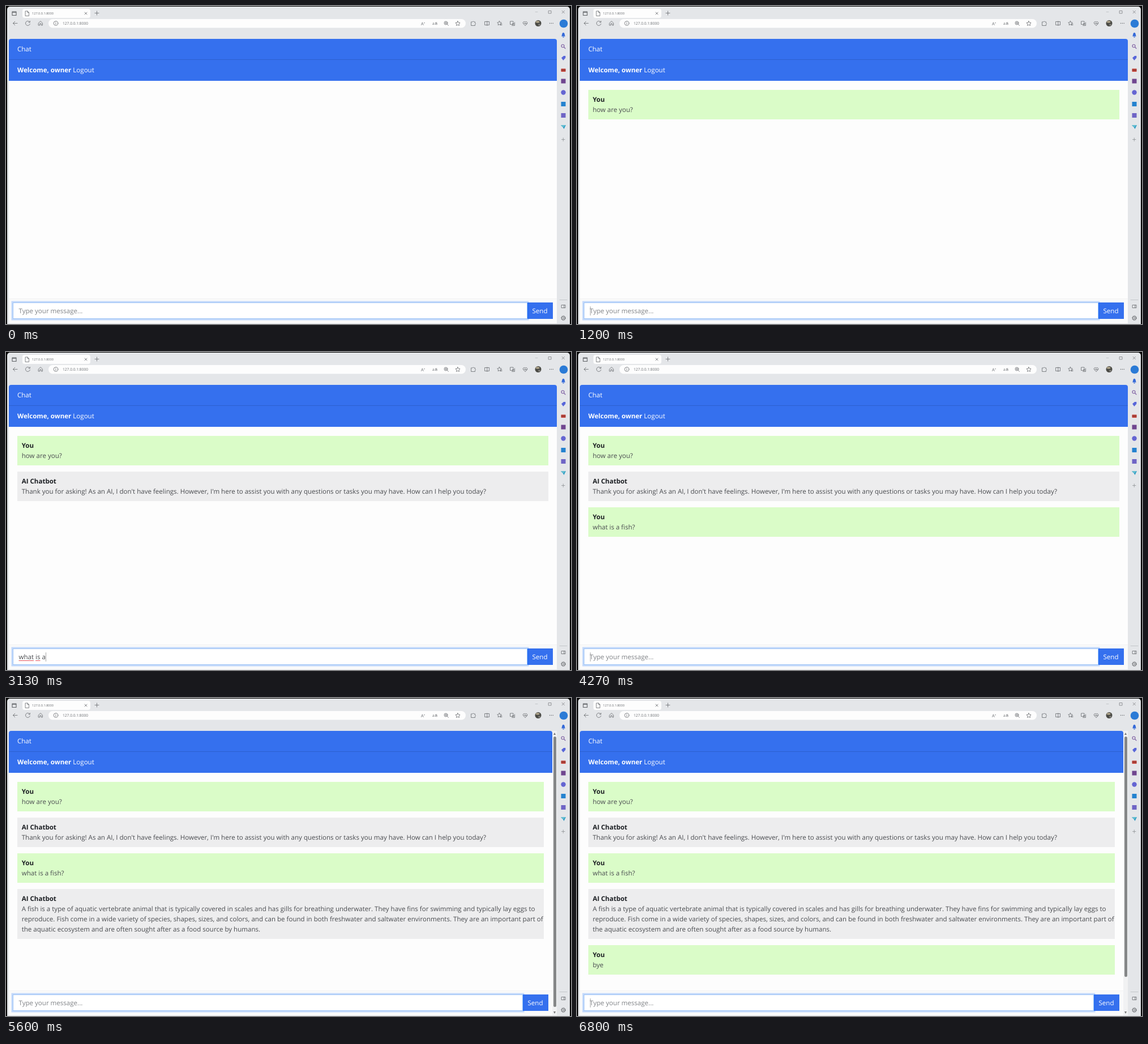
Write an HTML page that moves like this. It is 998x561 px and loops after 7010 ms.

```html
<!DOCTYPE html>
<html lang="en">
<head>
<meta charset="utf-8">
<title>Chat</title>
<style>
  html, body { margin: 0; width: 998px; height: 561px; overflow: hidden; background: #000; }
  body { position: relative; font: 11.55px/18.3px "Open Sans", sans-serif; color: #4a4c50; text-rendering: geometricPrecision; }
  body > *, .chat > *, .bar { position: absolute; box-sizing: border-box; }
  svg { left: 0; top: 0; }
  .chat { left: 5px; top: 58px; width: 968px; height: 502px; background: #fdfdfd; border-radius: 4px; }
  .scrolling .chat { width: 960px; }
  .head { left: 0; right: 0; height: 37px; padding: 0 15px; line-height: 38.2px; background: #3570ee; color: #fff; }
  .head:first-child { border-radius: 4px 4px 0 0; border-bottom: 1px solid #2d60d0; }
  .head + .head { top: 37px; }
  .messages { left: 15px; right: 15.5px; top: 90px; }
  .message { padding: 8.6px 7.7px 6.6px; margin-bottom: 11.2px; background: #ededee; white-space: pre; }
  .message.you { background: #dafcc8; }
  .message b { display: block; color: #1c1f23; }
  .foot { left: 0; right: 0; bottom: 0; height: 44px; background: #fafafa; border-top: 1px solid #f2f2f2; }
  .input { left: 7px; right: 52px; top: 465px; height: 29px; padding-left: 9.5px; line-height: 29.2px; white-space: pre; z-index: 1;
    background: #fff; border: 1px solid #9cc3f5; box-shadow: 0 0 0 2.5px rgba(13, 110, 253, .23); }
  .input u { text-decoration: underline solid #e0525c .8px; text-underline-offset: 2px; }
  .hint { color: #808387; }
  .caret { display: inline-block; width: 1px; height: 16px; margin-right: -1px; vertical-align: -4px; background: #aaa; }
  .send { right: 7px; top: 465px; width: 46px; height: 29px; line-height: 31.2px; text-align: center; background: #3570ee; color: #fff; }
  .bar { display: none; left: 965px; top: 58px; width: 8px; height: 502px; background: #f1f2f3; }
  .scrolling .bar { display: block; }
  .bar i { position: absolute; left: 2px; top: 10px; width: 4.5px; border-radius: 3px; background: #858788; }
  .bar::before, .bar::after { content: ""; position: absolute; left: 2px; border: 2.5px solid transparent; }
  .bar::before { top: 1px; border-bottom: 4px solid #777; }
  .bar::after { bottom: 1px; border-top: 4px solid #777; }
</style>
</head>
<body>
<svg width="998" height="561" fill="none" stroke="#5f6266" stroke-width=".75" stroke-linecap="round" stroke-linejoin="round">
  <rect x="2" y="1" width="994" height="570" rx="5" fill="#e4e6e9" stroke="none"/>
  <g fill="#fdfdfd" stroke="none">
    <rect x="29" y="5" width="120" height="16" rx="4"/>
    <rect x="75" y="23" width="737" height="15.5" rx="7.7"/>
  </g>
  <!-- tab strip and window buttons -->
  <path d="M11 10h7v6.500h-7zM11 11.300h7" stroke-width="1.100"/>
  <path d="M34.500 9h3.500l2.500 2.500v6h-6zM38 9v2.500h2.500"/>
  <path d="M139 11l4 4m0-4l-4 4M157 12.500h7m-3.500-3.500v7"/>
  <path d="M935 10.500h4" stroke="#b9bcc0"/>
  <path d="M958.500 8.500h4.500v4.500h-4.500zM982 8.300l4.500 4.500m0-4.500l-4.500 4.500" stroke="#77797c"/>
  <!-- toolbar -->
  <path d="M20 30.500h-7.500m3.300-3.300l-3.300 3.300l3.300 3.300M42 28.500a4 4 0 1 0 .4 3M42.300 26.500v2.300h-2.300M57.500 30l3.500-3.300l3.500 3.300v4h-2.300v-3h-2.400v3h-2.300z"/>
  <circle cx="88" cy="30.500" r="3.800"/><path d="M88 30v2.300M88 28.500v.1"/>
  <g id="stars"></g>
  <circle cx="777" cy="30" r="3"/><path d="M779.200 32.200l2.300 2.300M775.500 30h3M777 28.500v3"/>
  <path d="M822 28h2.200a1.500 1.500 0 0 1 2.600 0h1.700v2a1.300 1.300 0 0 1 0 2.500v2h-6.500z"/>
  <path d="M846 27.500h7.500v6h-7.500zM849.800 27v7.500M891 27h5v5.500h-5zM893.500 34.500h5v-5.500M895.800 30.300v3M894.300 31.800h3"/>
  <path d="M917 34.500l-3.300-3.500a2 2 0 0 1 3.300-2.600a2 2 0 0 1 3.300 2.600zM915 31h1.200l.8-1.300l1 2.300l.7-1h2"/>
  <path d="M960.500 30.500h.1M963.300 30.500h.1M966.100 30.500h.1" stroke-width="1.300"/>
  <g stroke="none">
    <circle cx="940" cy="30.500" r="5.500" fill="#4a4a45"/><ellipse cx="939" cy="28" rx="3.500" ry="1.700" fill="#b3a88e"/><ellipse cx="942" cy="33" rx="2" ry="1.500" fill="#85847f"/>
    <circle cx="985" cy="31" r="7.300" fill="#2b7bd6"/>
  </g>
  <g fill="#6b6e72" stroke="none" font-family="Open Sans, sans-serif">
    <text x="46" y="15.200" font-size="5.600">127.0.0.1:8000</text>
    <text x="100" y="33" font-size="6.650">127.0.0.1:8000</text>
    <text x="733" y="33.500" font-size="7.500">A<tspan dy="-2.500" font-size="5">&#187;</tspan></text>
    <text x="753" y="33" font-size="6.500">a<tspan font-family="Noto Sans CJK JP, sans-serif" font-size="6">あ</tspan></text>
  </g>
  <!-- sidebar -->
  <g stroke="none">
    <path d="M981 53.500c1.500-1 .5-6.500 3.500-6.500s2 5.500 3.500 6.500zM983.300 54.300h2.500v1.200h-2.500z" fill="#3469d8"/>
    <path d="M981 91.500l4-3.500h3.300v3.500l-4 4.500z" fill="#5866d9"/>
    <path d="M980.500 110.500h8v5.500h-8z" fill="#c4473c"/><path d="M980.500 112.500h8v1h-8z" fill="#6d2b2b"/>
    <rect x="980.500" y="128.500" width="8" height="8" fill="#70468f"/>
    <circle cx="984.500" cy="152.500" r="4.200" fill="#6565d2"/>
    <rect x="980.500" y="169" width="8" height="8" fill="#2482cf"/>
    <rect x="980.500" y="189" width="8" height="8" fill="#6f64c5"/>
    <path d="M980 210.500l9-.5l-3.500 7l-1.700-3z" fill="#2c9cc4"/><path d="M980 210.500l9-.5l-5 4z" fill="#67bfd2"/>
  </g>
  <g stroke="#7a5aa0" stroke-width="1.100"><circle cx="983.500" cy="70.500" r="2.500"/><path d="M985.500 72.500l2.500 2.500"/></g>
  <path d="M981.500 235.500h5.500m-2.750-2.750v5.500" stroke="#888b8f"/>
  <path d="M978 518.500h13" stroke="#b9bcc0"/>
  <path d="M981.500 527.500h6.500v5h-6.500zM985.700 527.500v5"/>
  <circle cx="984.500" cy="550.500" r="3.300" stroke-width="1"/><circle cx="984.500" cy="550.500" r="1.200"/>
  <circle cx="984.500" cy="550.500" r="4.100" stroke-dasharray="1 2.200" stroke-linecap="butt"/>
</svg>

<div class="chat">
  <div class="head">Chat</div>
  <div class="head"><b>Welcome, owner</b> Logout</div>
  <div class="messages"></div>
  <div class="foot"></div>
  <div class="input"></div>
  <div class="send">Send</div>
</div>
<div class="bar"><i></i></div>

<script>
const LOOP = 7010, BLINK = 192, REPLY_2 = 4610;
const $ = selector => document.querySelector(selector);

// Each line is typed one key at a time, then sent.
const typed = [
  { text: "how are you?", start: 30, step: 80, send: 1080 },
  { text: "what is a fish?", start: 2480, step: 80, send: 3870 },
  { text: "bye", start: 5980, step: 90, send: 6410 },
];
const messages = [
  { at: typed[0].send, you: true, text: typed[0].text },
  { at: 1710, text: "Thank you for asking! As an AI, I don't have feelings. However, I'm here to assist you with any questions or tasks you may have. How can I help you today?" },
  { at: typed[1].send, you: true, text: typed[1].text },
  { at: REPLY_2, text: `A fish is a type of aquatic vertebrate animal that is typically covered in scales and has gills for breathing underwater. They have fins for swimming and typically lay eggs to
reproduce. Fish come in a wide variety of species, shapes, sizes, and colors, and can be found in both freshwater and saltwater environments. They are an important part of
the aquatic ecosystem and are often sought after as a food source by humans.` },
  { at: typed[2].send, you: true, text: typed[2].text },
];

for (const m of messages) {
  m.el = document.createElement("div");
  m.el.className = m.you ? "message you" : "message";
  m.el.innerHTML = `<b>${m.you ? "You" : "AI Chatbot"}</b>${m.text}`;
  $(".messages").append(m.el);
}

const star = (cx, cy, r) => {
  const points = Array.from({ length: 10 }, (_, i) => {
    const a = i * Math.PI / 5 - Math.PI / 2, d = i % 2 ? r / 2 : r;
    return `${cx + d * Math.cos(a)},${cy + d * Math.sin(a)}`;
  });
  return `<polygon points="${points.join(" ")}"/>`;
};
$("#stars").innerHTML = star(798, 31, 4.3) + star(871.5, 30.5, 4) + '<path d="M873 33.500h3M874 31.500h2"/>';

function inputHtml(t) {
  let text = "", lastKey = -BLINK;
  for (const { text: line, start, step, send } of typed) {
    if (t >= send) {
      lastKey = send;
    } else if (t >= start) {
      const count = Math.min(line.length, Math.floor((t - start) / step) + 1);
      text = line.slice(0, count);
      lastKey = start + (count - 1) * step;
    }
  }
  const caret = Math.floor((t - lastKey) / BLINK) % 2 ? "" : '<span class="caret"></span>';
  // The spell checker marks finished words.
  return text
    ? text.replace(/[a-z]{2,}(?=[^a-z])/g, "<u>$&</u>") + caret
    : caret + '<span class="hint">Type your message...</span>';
}

let shown;
function draw() {
  const t = performance.now() % LOOP;
  for (const m of messages) m.el.hidden = t < m.at;
  document.body.classList.toggle("scrolling", t >= REPLY_2);
  $(".bar i").style.height = (t < typed[2].send ? 477 : 424) + "px";
  const html = inputHtml(t);
  if (html !== shown) $(".input").innerHTML = shown = html;
  requestAnimationFrame(draw);
}
draw();
</script>
</body>
</html>
```
